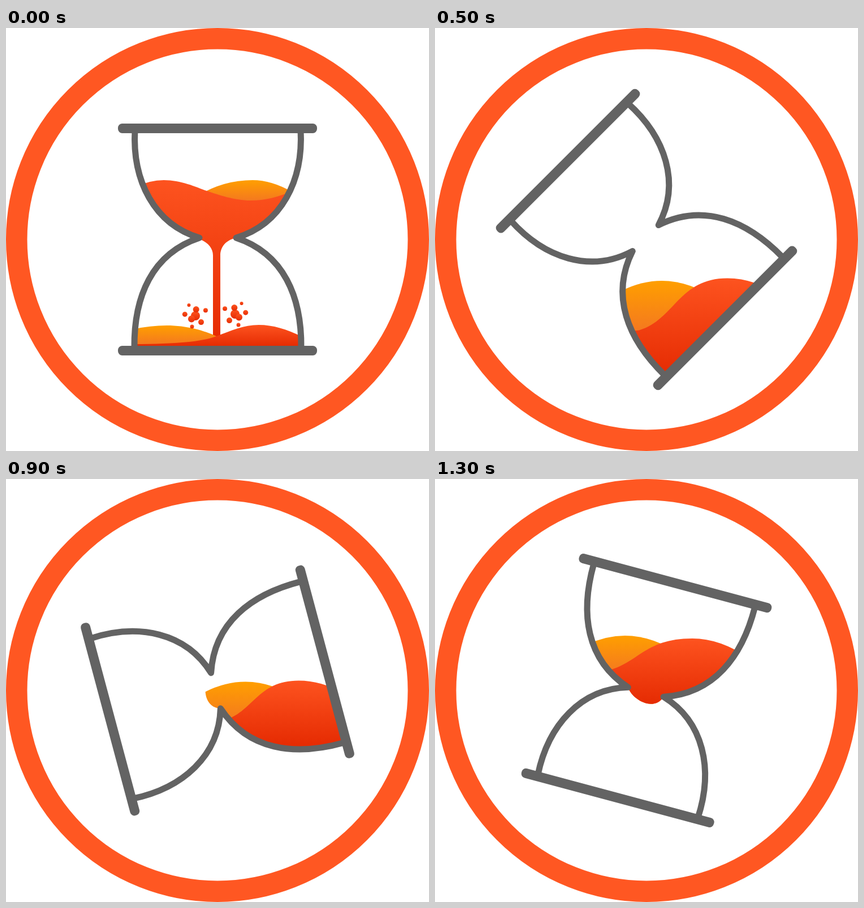
These frames come from a looping animation (748x748 px, 1400 ms). An HTML page with a canvas:

```html
<!DOCTYPE html>
<html lang="en">
<head>
<meta charset="utf-8">
<title>Hourglass</title>
<style>
  html, body { margin: 0; width: 100%; height: 100%; overflow: hidden; background: #fff; }
  canvas { display: block; width: 100vmin; height: 100vmin; }
</style>
</head>
<body>
<canvas id="stage" width="748" height="748"></canvas>
<script>
const ctx = document.getElementById('stage').getContext('2d');
const SIZE = 748, MID = SIZE / 2, STEP_MS = 100, STEPS = 14;
const TILT = Math.PI / 12, GOLDEN = Math.PI * (3 - Math.sqrt(5));
const AMBER = ['#ff9f00', '#f4791f'], SAND = ['#fd531f', '#e62c03'];
const GREY = '#636363', ORANGE = '#ff5722';

const leftWall = new Path2D('M228 180C223 270 262 347 342 371C258 399 226 475 227 566');
const rightWall = new Path2D();
rightWall.addPath(leftWall, new DOMMatrix([-1, 0, 0, 1, SIZE + 1, 0]));

const topBulb = new Path2D('M228 180C223 270 262 347 342 371H407C487 347 526 270 521 180Z');
// The lower bulb includes the drop that hangs through the neck once it is turned over.
const lowerBulb = new Path2D(
  'M342 371C258 399 226 475 227 566H522C523 475 491 399 407 371C395 352 352 340 342 371Z');

const pouring = {
  topAmber: new Path2D('M340 296Q385 269 436 269Q470 269 506 290V420H340Z'),
  topSand: new Path2D('M230 281Q254 269 279 269C310 269 335 281 355 288S405 305 432 305S480 299 508 288V420H230Z'),
  stream: new Path2D('M344 366H404V372C388 376 379 388 379 402V548H366V402C366 390 358 380 344 374Z'),
  lowAmber: new Path2D('M220 534Q252 526 284 526C320 526 350 535 372 545V600H220Z'),
  lowSand: new Path2D('M220 559C300 559 345 555 372 545S420 525 447 525S500 534 528 548V600H220Z')
};

// Crests of the liquid by number of turns; depth is where the sand meets the left wall.
const poses = [
  { turn: 1, amber: [350, 490], sand: [485, 487], depth: 67 },
  { turn: 2, amber: [375, 483], sand: [497, 481], depth: 103 },
  { turn: 4, amber: [427, 411], sand: [537, 404], depth: 72 },
  { turn: 6, amber: [427, 402], sand: [517, 403], depth: 50 },
  { turn: 8, amber: [420, 315], sand: [518, 310], depth: 88 },
  { turn: 11, amber: [336, 277], sand: [455, 282], depth: 64 }
];

function poseAt(turn) {
  const next = poses.find(p => p.turn >= turn);
  const prev = poses.findLast(p => p.turn <= turn);
  const mix = (turn - prev.turn) / (next.turn - prev.turn || 1);
  const lerp = (a, b) => a + (b - a) * mix;
  const between = key => prev[key].map((v, i) => lerp(v, next[key][i]));
  return { amber: between('amber'), sand: between('sand'), depth: lerp(prev.depth, next.depth) };
}

// Lowest stage height among the base corner, the wall's belly and the neck.
function lowestPoint(angle) {
  const probes = [[-147, 188], [-117, 71], [0, -22]];
  return MID + Math.max(...probes.map(([x, y]) => x * Math.sin(angle) + y * Math.cos(angle)));
}

function fill(path, [from, to], top, bottom) {
  const gradient = ctx.createLinearGradient(0, top, 0, bottom);
  gradient.addColorStop(0, from);
  gradient.addColorStop(1, to);
  ctx.fillStyle = gradient;
  ctx.fill(path);
}

function turnStage(angle) {
  ctx.translate(MID, MID);
  ctx.rotate(angle);
  ctx.translate(-MID, -MID);
}

function inside(bulb, angle, paint) {
  ctx.save();
  turnStage(angle);
  ctx.clip(bulb);
  turnStage(-angle);
  paint();
  ctx.restore();
}

// A spiral of shrinking dots around one large bubble.
function drawSpray(x, y, side) {
  for (let i = 0; i < 8; i++) {
    const reach = 9.5 * Math.sqrt(i), turn = i * GOLDEN;
    const r = i ? 6.5 - i * 0.5 : 8;
    const dotY = y + reach * Math.sin(turn) * 0.85;
    const dot = new Path2D();
    dot.arc(x + side * reach * Math.cos(turn), dotY, r, 0, 2 * Math.PI);
    fill(dot, SAND, dotY - r, dotY + r);
  }
}

function drawPouring(sink, rise) {
  inside(topBulb, 0, () => {
    ctx.translate(0, sink);
    fill(pouring.topAmber, AMBER, 269, 305);
    fill(pouring.topSand, SAND, 269, 545);
  });
  fill(pouring.stream, SAND, 269, 545);
  inside(lowerBulb, 0, () => {
    ctx.translate(0, -rise);
    fill(pouring.lowAmber, AMBER, 526, 559);
    fill(pouring.lowSand, SAND, 525, 562);
  });
  drawSpray(335, 509 - rise, 1);
  drawSpray(405, 506 - rise, -1);
}

function drawTurning(turn, angle) {
  const { amber: [ax, ay], sand: [sx, sy], depth } = poseAt(turn);
  const reach = 100, drop = 35;
  const footX = ax - 40, footY = ay + depth;
  const dx = sx - footX, dy = sy - footY;

  const amber = new Path2D();
  amber.moveTo(ax - reach, ay + drop);
  amber.quadraticCurveTo(ax, ay - drop, ax + reach, ay + drop);
  amber.lineTo(ax + reach, SIZE);
  amber.lineTo(ax - reach, SIZE);

  const sand = new Path2D();
  sand.moveTo(footX - reach, footY + 10);
  sand.lineTo(footX, footY);
  sand.bezierCurveTo(footX + dx * 0.4, footY + dy * 0.2, sx - dx * 0.55, sy, sx, sy);
  sand.quadraticCurveTo(sx + reach / 2, sy, sx + reach, sy + drop);
  sand.lineTo(sx + reach, SIZE);
  sand.lineTo(footX - reach, SIZE);

  inside(lowerBulb, angle, () => {
    fill(amber, AMBER, ay, footY);
    fill(sand, SAND, sy, lowestPoint(angle));
  });
}

function drawGlass(angle) {
  ctx.save();
  turnStage(angle);
  ctx.strokeStyle = ctx.fillStyle = GREY;
  ctx.lineWidth = 11;
  ctx.lineJoin = 'round';
  ctx.stroke(leftWall);
  ctx.stroke(rightWall);
  for (const y of [169, 562]) {
    ctx.beginPath();
    ctx.roundRect(198, y, 352, 17, 7.5);
    ctx.fill();
  }
  ctx.restore();
}

function drawRing() {
  ctx.beginPath();
  ctx.arc(MID, MID, 355.25, 0, 2 * Math.PI);
  ctx.lineWidth = 37.5;
  ctx.strokeStyle = ORANGE;
  ctx.stroke();
}

function draw(step) {
  // Upright for two steps, then the first tilt is held for two.
  const turn = step < 2 ? 0 : Math.max(1, step - 2);
  const angle = -turn * TILT;
  ctx.fillStyle = '#fff';
  ctx.fillRect(0, 0, SIZE, SIZE);
  drawRing();
  if (turn) drawTurning(turn, angle);
  else drawPouring(step * 40, step * 30);
  drawGlass(angle);
}

const start = performance.now();
let shown = -1;
function tick() {
  const step = Math.floor((performance.now() - start) / STEP_MS) % STEPS;
  if (step !== shown) draw(shown = step);
  requestAnimationFrame(tick);
}
tick();
</script>
</body>
</html>
```
